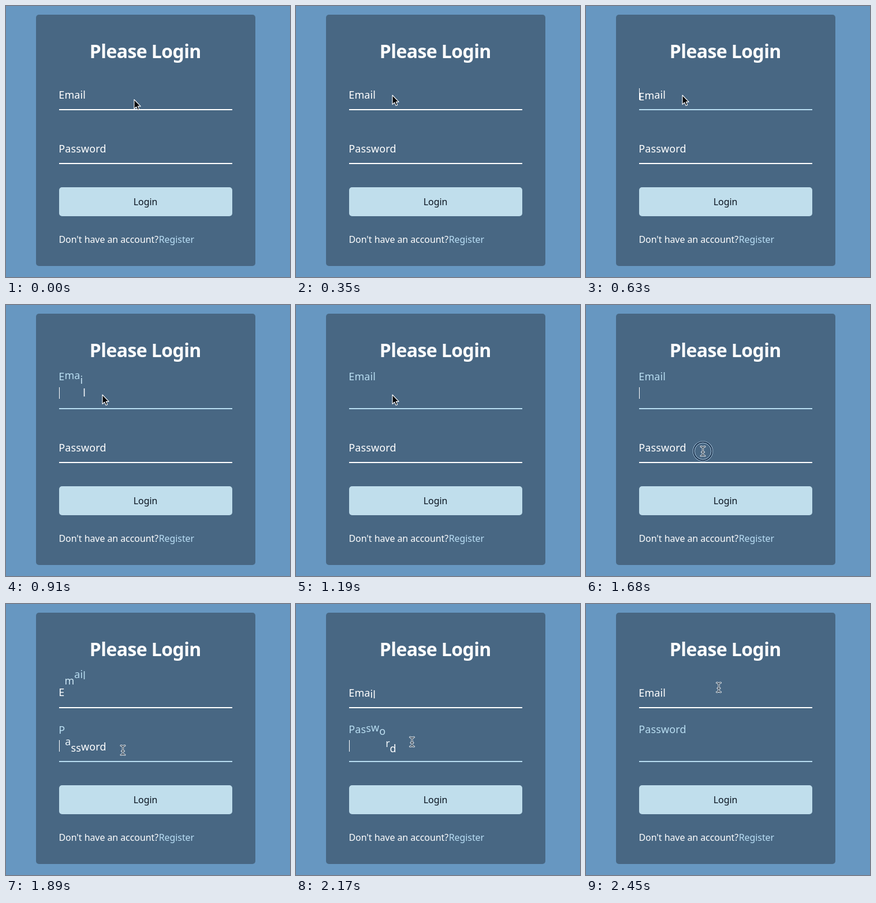
Animation, 492 px wide and 468 px high, one loop 2520 ms. Source, as an HTML page:

```html
<!DOCTYPE html>
<html lang="en">
<head>
<meta charset="utf-8">
<title>Login form</title>
<style>
  html, body { margin: 0; width: 100%; height: 100%; overflow: hidden; background: #6797c1; }
  svg { display: block; width: 492px; height: 468px; font-family: "Noto Sans", "Open Sans", sans-serif; }
  text { fill: #fff; white-space: pre; }
  .title { font-size: 32px; font-weight: 700; letter-spacing: -.6px; }
  .label { font-size: 18px; letter-spacing: .1px; }
  .small { font-size: 16px; letter-spacing: -.08px; }
</style>
</head>
<body>
<svg viewBox="0 0 492 468">
  <rect width="492" height="468" fill="#6797c1"/>
  <rect x="52" y="15" width="380" height="434" rx="5" fill="#486783"/>
  <text class="title" x="241.3" y="89.5" text-anchor="middle">Please Login</text>
  <g id="fields"></g>
  <rect x="92" y="313" width="300" height="50" rx="5" fill="#c0deec"/>
  <text class="small" x="241.5" y="344" text-anchor="middle" style="fill:#0a1420">Login</text>
  <text class="small" x="91.5" y="409">Don't have an account?</text>
  <text class="small" x="264.7" y="409" style="fill:#b9def5">Register</text>
  <g id="pointer">
    <g id="ring" fill="none">
      <circle r="17" stroke="#a9c4dc" stroke-width="1.2"/>
      <circle r="15.8" stroke="#142c47" stroke-width="1.8"/>
      <circle r="14.4" stroke="#a9c4dc" stroke-width="1"/>
    </g>
    <path id="arrow" d="M0 0V16L3.7 12.6L6.1 18L8.7 16.9L6.4 11.6H11.2Z" fill="#05080c" stroke="#fff" stroke-width="1.1" stroke-linejoin="round"/>
    <g id="beam" fill="none" stroke-linecap="round">
      <path id="beamEdge" stroke="#e8eff5" stroke-width="3"/>
      <path id="beamCore" stroke="#1c2c3c" stroke-width="1.1"/>
    </g>
  </g>
</svg>
<script>
const LOOP = 2520, STEP = 70;
const RATE = 0.87;            // speed of the letter wave
const EMAIL_AT = 550, PASSWORD_AT = 1682;
const WHITE = [255, 255, 255], LIGHT = [184, 221, 241];
const $ = id => document.getElementById(id);

function make(parent, tag, attrs) {
  const node = document.createElementNS("http://www.w3.org/2000/svg", tag);
  for (const key in attrs) node.setAttribute(key, attrs[key]);
  return parent.appendChild(node);
}

function makeField(word, top) {
  const line = make($("fields"), "rect", { x: 92, y: top + 178, width: 300, height: 2 });
  const caret = make($("fields"), "rect", { x: 92, y: top + 142, width: 1, height: 20, fill: "#fff" });
  const label = make($("fields"), "text", { class: "label", x: 91.3, y: top + 160 });
  const letters = [...word].map(char => {
    const span = make(label, "tspan", {});
    span.textContent = char;
    return span;
  });
  return { line, caret, letters };
}

const email = makeField("Email", 0);
const password = makeField("Password", 93);
const beamShape = "M-3.5 -8Q0 -8 0 -5V5Q0 8 -3.5 8M3.5 -8Q0 -8 0 -5V5Q0 8 3.5 8M-2 1.5H2";
$("beamEdge").setAttribute("d", beamShape);
$("beamCore").setAttribute("d", beamShape);

const bezier = (a, b, s) => 3 * (1 - s) ** 2 * s * a + 3 * (1 - s) * s * s * b + s ** 3;

// cubic-bezier(.68, -.55, .265, 1.55)
function backEase(x) {
  if (x <= 0) return 0;
  if (x >= 1) return 1;
  let low = 0, high = 1;
  for (let i = 0; i < 24; i++) {
    const mid = (low + high) / 2;
    if (bezier(.68, .265, mid) < x) low = mid; else high = mid;
  }
  return bezier(-.55, 1.55, low);
}

function mix(from, to, k) {
  k = Math.min(1, Math.max(0, k));
  return `rgb(${from.map((v, i) => Math.round(v + (to[i] - v) * k))})`;
}

function drawField(field, t, focusAt, blurAt) {
  const focused = t >= focusAt && t < blurAt;
  field.line.setAttribute("fill", mix(WHITE, LIGHT, focused ? 1 : 0));
  const caretOn = focused && (t - focusAt) % 1000 < 500;
  field.caret.setAttribute("visibility", caretOn ? "visible" : "hidden");
  let previous = 0;
  field.letters.forEach((span, i) => {
    const wave = start => backEase(((t - start) * RATE - i * 50) / 300);
    const raised = wave(focusAt) - wave(blurAt);
    const y = -30 * raised;
    span.setAttribute("dy", (y - previous).toFixed(2));
    span.style.fill = mix(WHITE, LIGHT, raised);
    previous = y;
  });
}

const path = [
  [0, 222, 161.5], [210, 167, 154], [700, 167, 154], [840, 167, 155], [1300, 167, 155],
  [1610, 202.5, 252.5], [2030, 202.5, 252.5], [2170, 201, 238], [2450, 230, 144]
];

function pointerAt(t) {
  const next = path.findIndex(p => p[0] > t);
  if (next < 0) return path[path.length - 1].slice(1);
  const a = path[next - 1], b = path[next];
  const k = (t - a[0]) / (b[0] - a[0]), ease = k * k * (3 - 2 * k);
  return [a[1] + (b[1] - a[1]) * ease, a[2] + (b[2] - a[2]) * ease];
}

function draw(t) {
  drawField(email, t, EMAIL_AT, PASSWORD_AT);
  drawField(password, t, PASSWORD_AT, Infinity);
  const [x, y] = pointerAt(t);
  const show = (id, on) => $(id).setAttribute("visibility", on ? "visible" : "hidden");
  $("pointer").setAttribute("transform", `translate(${x.toFixed(2)} ${y.toFixed(2)})`);
  show("arrow", t < 1450);
  show("beam", t >= 1450);
  show("ring", (t >= 420 && t < EMAIL_AT) || (t >= 1610 && t < 1760));
}

function tick() {
  const t = performance.now() % LOOP;
  draw(Math.floor(t / STEP) * STEP);
  requestAnimationFrame(tick);
}
tick();
</script>
</body>
</html>
```
